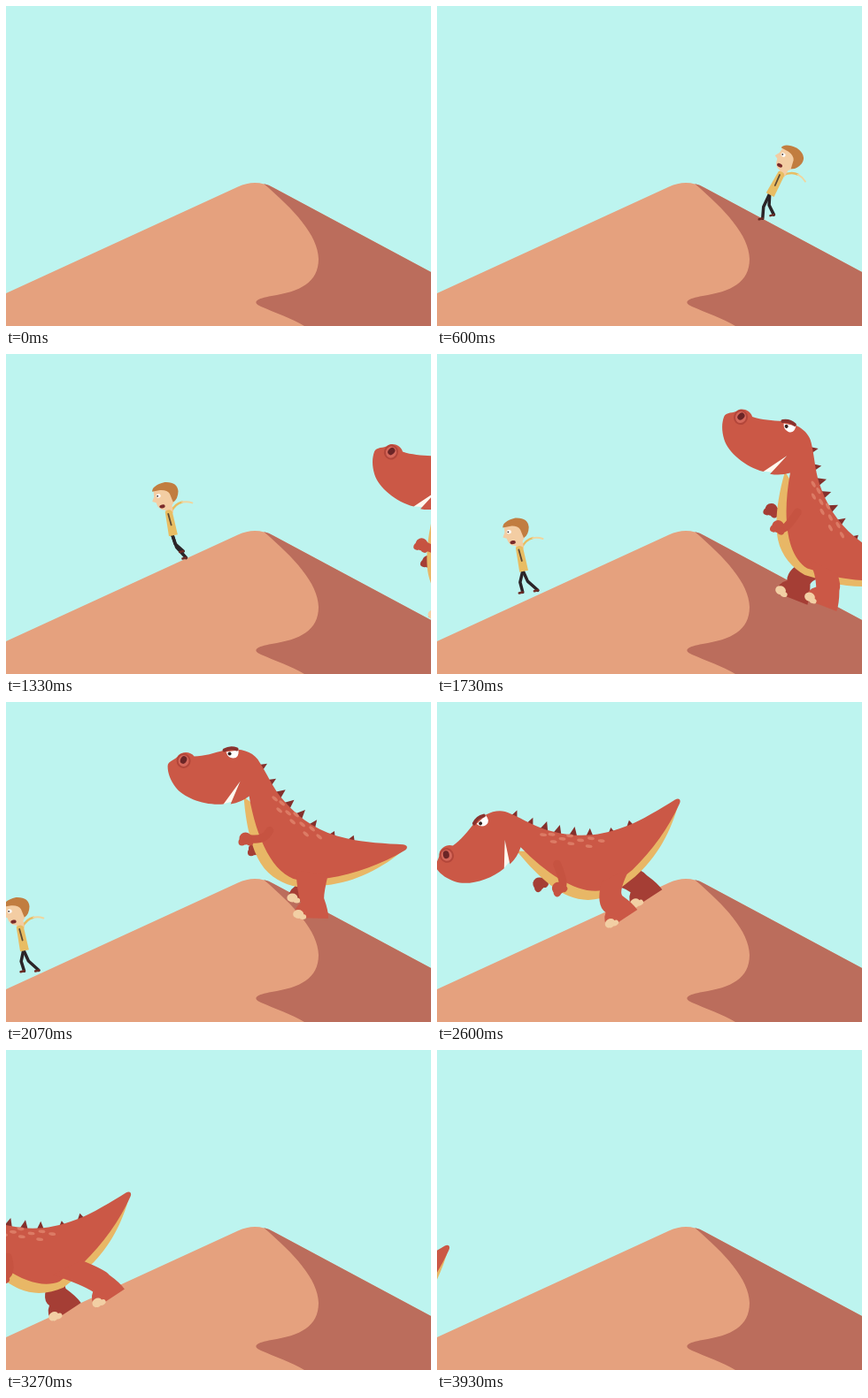
Animation of 480x362 px, one loop 3990 ms. Source, as an HTML page with a canvas:

```html
<!DOCTYPE html>
<html lang="en">
<head>
<meta charset="utf-8">
<title>Dune chase</title>
<style>
html, body { margin: 0; height: 100%; overflow: hidden; background: #bdf4ef; }
canvas { display: block; width: 480px; height: 362px; }
</style>
</head>
<body>
<canvas id="stage" width="480" height="362"></canvas>
<script>
const ctx = document.getElementById('stage').getContext('2d');
const LOOP = 3990, TAU = Math.PI * 2;
const RED = '#cb5846', DARK = '#a53e35', BELLY = '#e8b766', TOE = '#f2cfa4';
const SKIN = '#f3cda3', HAIR = '#c17d40', SHIRT = '#e8bd63', PANTS = '#2b2528';

// time, x, stride count
const MAN = [[600, 376, 0], [1330, 188, 2.65], [2070, 20, 4.8]];
const DINO = [[1330, 511, -.12], [2070, 341, 1.27], [2600, 219, 2.12], [3270, 85.5, 3.47], [3930, -41.5, 4.87]];

const clamp = (v, lo, hi) => Math.min(hi, Math.max(lo, v));
const rad = deg => deg * Math.PI / 180;

// Linear through the keys, extended past both ends
function track(keys, t) {
  let i = 0;
  while (i < keys.length - 2 && t > keys[i + 1][0]) i++;
  const a = keys[i], b = keys[i + 1], k = (t - a[0]) / (b[0] - a[0]);
  return [1, 2].map(n => a[n] + (b[n] - a[n]) * k);
}

const ground = x => 195 + .038 * (x - 282) + .499 * Math.hypot(x - 282, 10);

function fill(color, d) {
  ctx.fillStyle = color;
  ctx.fill(new Path2D(d));
}
function line(color, width, d) {
  ctx.strokeStyle = color;
  ctx.lineWidth = width;
  ctx.stroke(new Path2D(d));
}
function oval(color, x, y, rx, ry = rx, turn = 0) {
  ctx.fillStyle = color;
  ctx.beginPath();
  ctx.ellipse(x, y, rx, ry, turn, 0, TAU);
  ctx.fill();
}

function scenery() {
  fill('#bdf4ef', 'M0 0H480V362H0Z');
  fill('#e5a17e', 'M0 325L262 204.5Q282 195 302 205.5L480 301V362H0Z');
  fill('#bb6d5c', `M291 201Q297 202 302 205.5L480 301V362H337
    C322 353 304 347 288 340C277 335 283 331 300 328C332 323 353 313 353 286C352 259 326 231 291 201Z`);
}

function manLeg(x, y, phase) {
  const a = phase * TAU;
  const fx = x + 5 - 13 * Math.cos(a);
  const fy = ground(fx) - 1 - 11 * Math.max(0, -Math.sin(a));
  const kx = (x + fx) / 2 - 3, ky = (y + fy) / 2 + 1;
  line(PANTS, 3.5, `M${x} ${y}L${kx} ${ky}L${fx} ${fy}`);
  line('#6d2c25', 2.5, `M${fx} ${fy}l-4 1`);
}

function man(t) {
  const [x, stride] = track(MAN, t);
  const y = ground(x) - 32.5 - 3 * Math.cos(TAU * (stride - .8));
  const tilt = clamp(-11 + (x - 240) * .42, -11, 28);
  manLeg(x, y, stride + .75);
  manLeg(x, y, stride);
  ctx.save();
  ctx.translate(x, y);
  ctx.rotate(rad(tilt));
  line(SHIRT, 2.5, 'M3 -25Q10 -34 18 -34');
  line('#efd6a0', 2, 'M18 -34Q24 -34 29 -31');
  fill(SKIN, 'M-3 -34H6V-24H-2Z');
  fill(SHIRT, 'M-3 -27Q2 -30 5 -26L6 1H-4Z');
  line('#5d4a35', 1.8, 'M0 -24L1 -11');
  fill(SKIN, 'M-11 -56L-12 -46L-15 -41L-11 -39Q-10 -30 -3 -29Q7 -30 11 -40L11 -56Z');
  fill(HAIR, 'M-13 -52Q-12 -59 3 -60Q17 -58 16 -47Q14 -38 8 -36L6 -46Q4 -51 -4 -52Z');
  oval('#fff', -7, -46, 2.6, 2.2);
  oval('#3a2b28', -8, -46, .9);
  oval('#7a2b2b', -5, -33.5, 3.2, 2);
  ctx.restore();
}

function dinoLeg(color, phase) {
  const a = phase * TAU, off = -5 - 25 * Math.cos(a);
  const x = 346 + off, y = 240 + off * .25 - 17 * Math.max(0, -Math.sin(a));
  fill(color, `M328 190Q${x - 16} ${y - 26} ${x - 11} ${y - 13}Q${x - 20} ${y - 7} ${x - 18} ${y + 4}
    L${x + 20} ${y + 5}Q${x + 20} ${y - 4} ${x + 15} ${y - 18}Q${x + 15} ${y - 25} 364 195Z`);
  oval(TOE, x - 14, y, 6, 5);
  oval(TOE, x - 9, y + 3, 4, 3);
}

function dinoArm(color, swing) {
  const x = 276 - 8 * swing, y = 160 - 9 * swing;
  line(color, 9, `M298 145Q292 ${y + 3} ${x + 4} ${y}`);
  oval(color, x, y, 7);
  oval(color, x - 4, y + 4, 4);
  oval(color, x + 5, y + 4, 4);
}

function dino(t) {
  const [x, stride] = track(DINO, t);
  const lift = 1 + 6.5 * Math.cos(2 * TAU * (stride - .44));
  const swing = Math.cos(2 * TAU * (stride - .34));
  ctx.save();
  ctx.translate(x, ground(x) - lift);
  ctx.rotate(rad(clamp((x - 341) * .284, -34.7, 20)));
  ctx.translate(-341, -229);

  dinoLeg(DARK, stride + .5);
  dinoArm(DARK, -swing);
  fill(BELLY, `M269 107C271 138 278 166 288 182C298 198 314 206 330 209
    L362 207C395 203 424 189 452 165L340 160Z`);

  // Back spikes: base position and lean
  [[288, 73, 50], [298, 90, 50], [309, 103, 45], [319, 115, 42], [332, 127, 36],
   [346, 139, 28], [368, 150, 16], [390, 155, 12]].forEach(([sx, sy, lean], i) => {
    const h = i > 5 ? 5 : 8;
    ctx.save();
    ctx.translate(sx, sy);
    ctx.rotate(rad(lean));
    fill('#84302c', `M-5 3L2 ${-h}L5 3Z`);
    ctx.restore();
  });

  fill('#fff8ee', 'M245 115L265 89L256 112Z');
  fill(RED, `M183 72C183 66 192 65 195 60C199 55 209 55 213 61C224 61 236 57 247 54
    C262 51 280 54 287 68C296 82 302 98 315 112C333 133 355 147 385 154
    C405 159 430 160 449 161C455 162 454 166 450 168C425 183 395 194 364 199
    L330 201C302 195 283 154 275 106Q266 113 254 115L265 89L246 115
    C225 117 201 108 192 96C186 88 183 80 183 72Z`);

  for (const [sx, sy] of [[304, 109], [312, 114], [309, 122], [319, 125], [328, 127],
    [324, 135], [335, 138], [346, 143], [339, 149], [354, 152]])
    oval('#dc7b65', sx, sy, 4, 1.8, rad(42));

  oval('#b3463a', 201, 66, 8, 8.5);
  oval('#d4675a', 201, 66, 6, 6.5);
  oval('#6b2526', 201, 65, 3.5, 4.5, rad(25));
  fill('#fff', 'M249 56L263 54Q264 63 257 63Q251 63 249 56Z');
  oval('#33211f', 253, 58, 2);
  line('#8a332f', 4, 'M247 54Q254 50 261 53');

  dinoLeg(RED, stride);
  dinoArm('#c65341', swing);
  ctx.restore();
}

function frame(now) {
  const t = now % LOOP;
  scenery();
  if (t < 2400) man(t);
  if (t > 1000) dino(t);
  requestAnimationFrame(frame);
}

ctx.lineCap = ctx.lineJoin = 'round';
frame(0);
</script>
</body>
</html>
```
